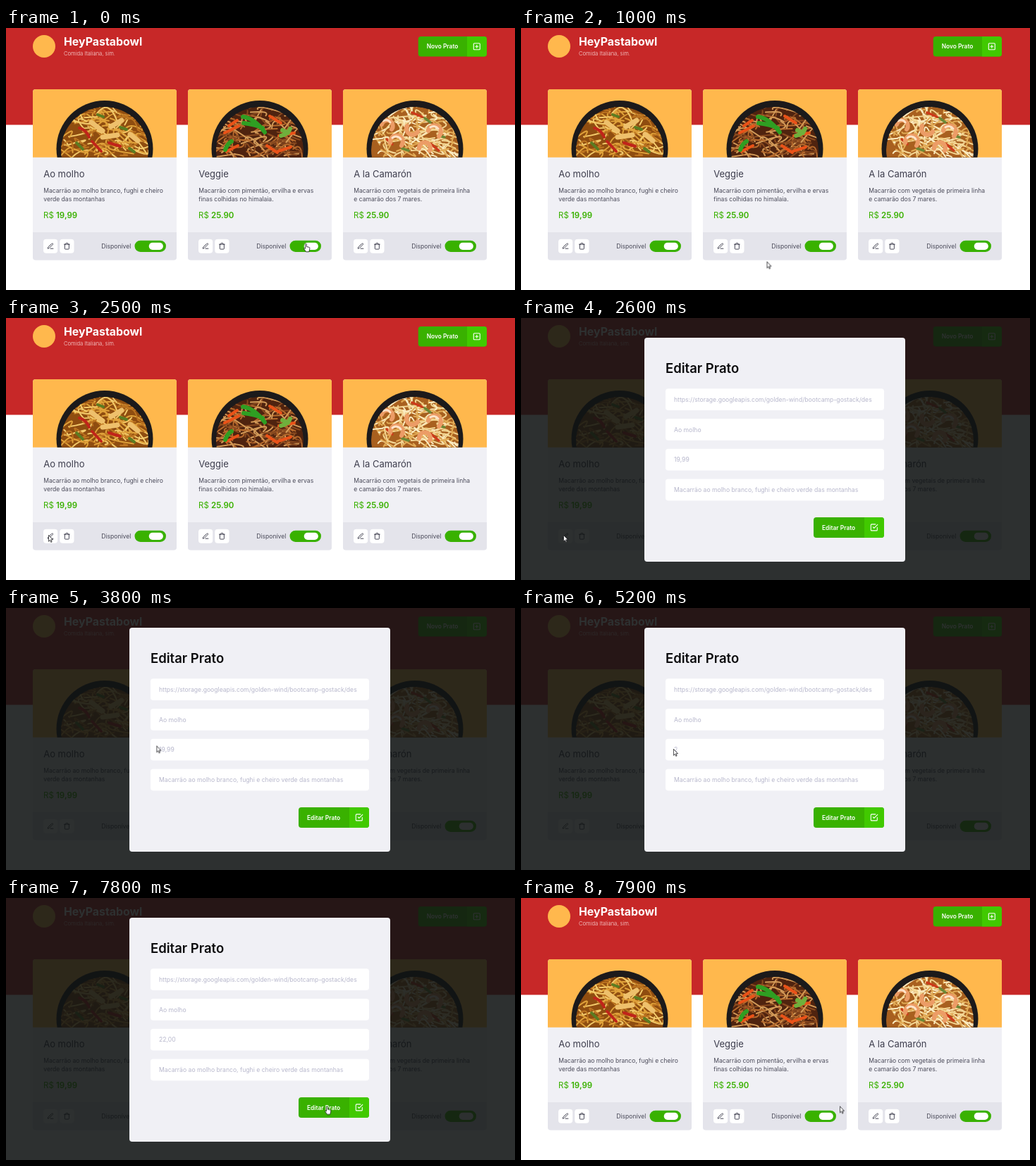
Recreate the animation shown at these times as an HTML page. Size 722 by 372 pixels, loop 8000 ms.

```html
<!DOCTYPE html>
<html lang="pt-BR">
<head>
<meta charset="utf-8">
<title>HeyPastabowl</title>
<style>
html, body { margin: 0; width: 100%; height: 100%; overflow: hidden; background: #fff; }
svg { display: block; width: 100vw; height: 100vh; }
text { font-family: Inter, "Open Sans", sans-serif; white-space: pre; }
.brand { font-size: 15.9px; font-weight: 700; fill: #fff; }
.tagline { font-size: 7.6px; font-weight: 300; fill: #f8dcdc; }
.btn { font-size: 8.4px; font-weight: 600; fill: #fff; }
.name { font-size: 13px; font-weight: 400; fill: #3d3d4d; }
.desc { font-size: 8.55px; fill: #4a4a59; }
.price { font-size: 11.5px; fill: #39b100; }
.bold { font-weight: 600; }
.title { font-size: 18.5px; font-weight: 600; fill: #0c0c0e; }
.field { font-size: 8.65px; fill: #b7b7cc; }
.icon { fill: none; stroke: #3d3d4d; stroke-width: 2.2; stroke-linecap: round; stroke-linejoin: round; }
.light { stroke: #fff; }

.modal, .cursor, .hand, .arrow, .old, .key { animation: 8s step-end infinite; }
.modal { animation-name: modal; }
.cursor { animation-name: move; }
.hand { animation-name: hand; }
.arrow { animation-name: arrow; }
.old { animation-name: old; }
.key { animation-name: key; animation-delay: calc(var(--at) * 1ms - 8000ms); }

@keyframes modal { 0%, 98.75% { opacity: 0; } 32.5% { opacity: 1; } }
@keyframes old { 0% { opacity: 1; } 58.75%, 100% { opacity: 0; } }
@keyframes key { 0% { visibility: visible; } 50%, 100% { visibility: hidden; } }
@keyframes hand { 0%, 93.75% { opacity: 1; } 8.75%, 98.75%, 100% { opacity: 0; } }
@keyframes arrow { 0%, 93.75% { opacity: 0; } 8.75%, 98.75%, 100% { opacity: 1; } }
/* the pointer is held for 100 ms at each place */
@keyframes move {
  0% { transform: translate(422px, 306px); }
  6.25% { transform: translate(422px, 306px); animation-timing-function: steps(5); }
  12.5% { transform: translate(348.5px, 331.5px); }
  13.75% { transform: translate(327px, 346px); }
  15% { transform: translate(283px, 350px); }
  16.25% { transform: translate(215px, 341px); }
  17.5% { transform: translate(163px, 325px); animation-timing-function: steps(4); }
  22.5% { transform: translate(95px, 308px); animation-timing-function: steps(2); }
  25% { transform: translate(43px, 301px); animation-timing-function: steps(2); }
  27.5% { transform: translate(60px, 308px); }
  32.5% { transform: translate(60px, 308px); animation-timing-function: steps(6); }
  40% { transform: translate(243px, 214px); animation-timing-function: steps(5); }
  46.25% { transform: translate(212.5px, 194px); animation-timing-function: steps(4); }
  51.25% { transform: translate(216px, 200px); }
  86.25% { transform: translate(216px, 200px); animation-timing-function: steps(7); }
  95%, 100% { transform: translate(452px, 295.5px); }
}
</style>
</head>
<body>
<svg viewBox="0 0 722 372" preserveAspectRatio="none">
  <defs>
    <clipPath id="card"><rect width="204" height="242.5" rx="4"/></clipPath>
    <clipPath id="photo"><rect width="204" height="96.7"/></clipPath>
    <clipPath id="food"><circle cx="102" cy="87" r="62"/></clipPath>
    <g id="pen"><path d="M12 20h9M16.5 3.5a2.12 2.12 0 0 1 3 3L7 19l-4 1 1-4z"/></g>
    <g id="trash"><path d="M3 6h18M8 6V4a2 2 0 0 1 2-2h4a2 2 0 0 1 2 2v2M19 6v14a2 2 0 0 1-2 2H7a2 2 0 0 1-2-2V6"/></g>
    <g id="plus"><rect x="3" y="3" width="18" height="18" rx="2"/><path d="M12 8v8M8 12h8"/></g>
    <g id="check"><path d="M9 11l3 3L22 4M21 12v7a2 2 0 0 1-2 2H5a2 2 0 0 1-2-2V5a2 2 0 0 1 2-2h11"/></g>
  </defs>

  <rect width="722" height="372" fill="#fff"/>
  <rect width="722" height="137.5" fill="#c72828"/>
  <circle cx="54" cy="26" r="16" fill="#ffb84d"/>
  <text class="brand" x="82" y="24.5">HeyPastabowl</text>
  <text class="tagline" x="82" y="38.5">Comida Italiana, sim.</text>

  <rect x="584.7" y="12" width="97.3" height="28.5" rx="4" fill="#39b100"/>
  <path d="M654 12h24a4 4 0 0 1 4 4v20.5a4 4 0 0 1-4 4h-24z" fill="#41c900"/>
  <text class="btn" x="596.7" y="29.3">Novo Prato</text>
  <use href="#plus" class="icon light" transform="translate(661.8 20.3) scale(.5)"/>

  <g id="cards"></g>

  <g class="modal">
    <rect width="722" height="372" fill="#101414" fill-opacity=".88"/>
    <rect x="175" y="28" width="370" height="318" rx="4" fill="#f0f0f5"/>
    <text class="title" x="205" y="77.5">Editar Prato</text>
    <g fill="#fff">
      <rect x="205" y="100.3" width="310" height="30.7" rx="4"/>
      <rect x="205" y="143" width="310" height="30.7" rx="4"/>
      <rect x="205" y="185.8" width="310" height="30.7" rx="4"/>
      <rect x="205" y="228.5" width="310" height="30.7" rx="4"/>
    </g>
    <text class="field" x="217" y="118.7">https://storage.googleapis.com/golden-wind/bootcamp-gostack/des</text>
    <text class="field" x="217" y="161.5">Ao molho</text>
    <text class="field old" x="217" y="204.3">19,99</text>
    <text class="field" x="217" y="204.3"><tspan class="key" style="--at:5200">2</tspan><tspan class="key" style="--at:5600">2</tspan><tspan class="key" style="--at:6000">,</tspan><tspan class="key" style="--at:6400">0</tspan><tspan class="key" style="--at:6500">0</tspan></text>
    <text class="field" x="217" y="247">Macarrão ao molho branco, fughi e cheiro verde das montanhas</text>
    <rect x="415" y="283" width="100" height="29" rx="4" fill="#39b100"/>
    <path d="M487 283h24a4 4 0 0 1 4 4v21a4 4 0 0 1-4 4h-24z" fill="#41c900"/>
    <text class="btn" x="427" y="300.6">Editar Prato</text>
    <use href="#check" class="icon light" transform="translate(494.8 291.4) scale(.5)"/>
  </g>

  <g class="cursor" fill="#fff" stroke="#16161a" stroke-width=".8" stroke-linejoin="round">
    <path class="arrow" d="M.4 .3V9.3L2.4 7.4 3.8 10.4 5.1 9.8 3.8 6.8H6.5z"/>
    <path class="hand" d="M2.6 7.2V1.3a.9.9 0 0 1 1.8 0v3.2l3.6.8q1 .3.9 1.4l-.5 2.8-.8 2.3H3.6L.5 7.4q.6-1.2 2.1-.2z"/>
  </g>
</svg>
<script>
const dishes = [
  { x: 38, name: 'Ao molho', price: '19,99',
    lines: ['Macarrão ao molho branco, fughi e cheiro', 'verde das montanhas'],
    base: '#8f4d10', noodles: ['#e0a23a', '#f3cb6c', '#bd7420'],
    bits: [['#c0241a', 'M66 55q9 2 14 13M84 74l13 14M108 76l16 5', 4],
           ['#5c7c22', 'M62 76l9 9M124 54l9 3M137 84l7 5M92 36l8 3', 4],
           ['#eec06c', 'M83 47l16 12M111 53l15-9M99 68l21-3M138 64l11 9', 7]] },
  { x: 258, name: 'Veggie', price: '25.90',
    lines: ['Macarrão com pimentão, ervilha e ervas', 'finas colhidas no himalaia.'],
    base: '#4f230f', noodles: ['#b5692c', '#8a4a1f', '#d39a58'],
    bits: [['#ea5218', 'M52 62l20-10M116 38l16 10M55 88l16-8M112 80l15 10M129 66l22-4M70 44l-12 8M128 88l18-6', 4],
           ['#2f9e22', 'M78 39q16 2 31 22M79 48q18 2 27 7M53 86q3-9 9-12', 6],
           ['#6fb03c', 'M134 58l6 3M145 56l-3 6M132 66l6-2', 6]] },
  { x: 478, name: 'A la Camarón', price: '25.90',
    lines: ['Macarrão com vegetais de primeira linha', 'e camarão dos 7 mares.'],
    base: '#a8601f', noodles: ['#f3d592', '#e2ac56', '#fbebc0'],
    bits: [['#cc3a1a', 'M98 33l14 6M62 71l8 7M124 77l12 10', 3.5],
           ['#6c8836', 'M116 41l8 6M84 84l9 3M136 66l8 2', 3.5],
           ['#ec9c66', 'M55 50a8 8 0 1 1 14 7M67 76a9 9 0 1 1 16 4M91 52a8 8 0 1 0 15 8M121 59a9 9 0 1 1 15 8M108 84a8 8 0 1 1 15 3', 6],
           ['#fde3c8', 'M57 45a7 7 0 0 1 10 2M70 69a8 8 0 0 1 12 2M124 54a8 8 0 0 1 11 2', 3]] }
];

let seed = 7;
const rand = (lo, hi) => {
  seed = (seed * 16807) % 2147483647;
  return +(lo + (hi - lo) * seed / 2147483647).toFixed(1);
};
const stroke = (color, d, w) =>
  `<path d="${d}" fill="none" stroke="${color}" stroke-width="${w}" stroke-linecap="round"/>`;
const strand = color => stroke(color,
  `M${rand(38, 160)} ${rand(25, 95)}q${rand(-25, 25)} ${rand(-22, 12)} ${rand(-35, 35)} ${rand(-8, 20)}`, 2);

const plate = dish => {
  let noodles = '';
  for (let i = 0; i < 120; i++) noodles += strand(dish.noodles[i % 3]);
  return `<g clip-path="url(#photo)">
    <circle cx="102" cy="84.5" r="68.5" fill="#1c1a1b"/>
    <g clip-path="url(#food)"><circle cx="102" cy="87" r="62" fill="${dish.base}"/>
    ${noodles}${dish.bits.map(b => stroke(...b)).join('')}</g></g>`;
};

const button = (x, icon) =>
  `<rect x="${x}" y="212.8" width="20.2" height="20" rx="4" fill="#fff"/>
   <use href="#${icon}" class="icon" transform="translate(${x + 4.9} 217.6) scale(.43)"/>`;

const card = dish => `<g transform="translate(${dish.x} 87)">
  <g clip-path="url(#card)">
    <rect width="204" height="243" fill="#f0f0f5"/>
    <rect width="204" height="96.7" fill="#ffb84d"/>
    <rect y="203" width="204" height="40" fill="#e4e4eb"/>
  </g>
  ${plate(dish)}
  <text class="name" x="15.2" y="125">${dish.name}</text>
  <text class="desc" x="15.3" y="146.5">${dish.lines[0]}</text>
  <text class="desc" x="15.3" y="159.1">${dish.lines[1]}</text>
  <text class="price" x="15" y="183">R$</text>
  <text class="price bold" x="33" y="183">${dish.price}</text>
  ${button(15, 'pen')}${button(38.3, 'trash')}
  <text class="desc" x="97.3" y="225.8">Disponível</text>
  <rect x="144.5" y="214.7" width="44.5" height="16.2" rx="8.1" fill="#39b100"/>
  <rect x="164.7" y="217.7" width="20.2" height="10.2" rx="5.1" fill="#fff"/>
</g>`;

document.getElementById('cards').innerHTML = dishes.map(card).join('');
</script>
</body>
</html>
```
